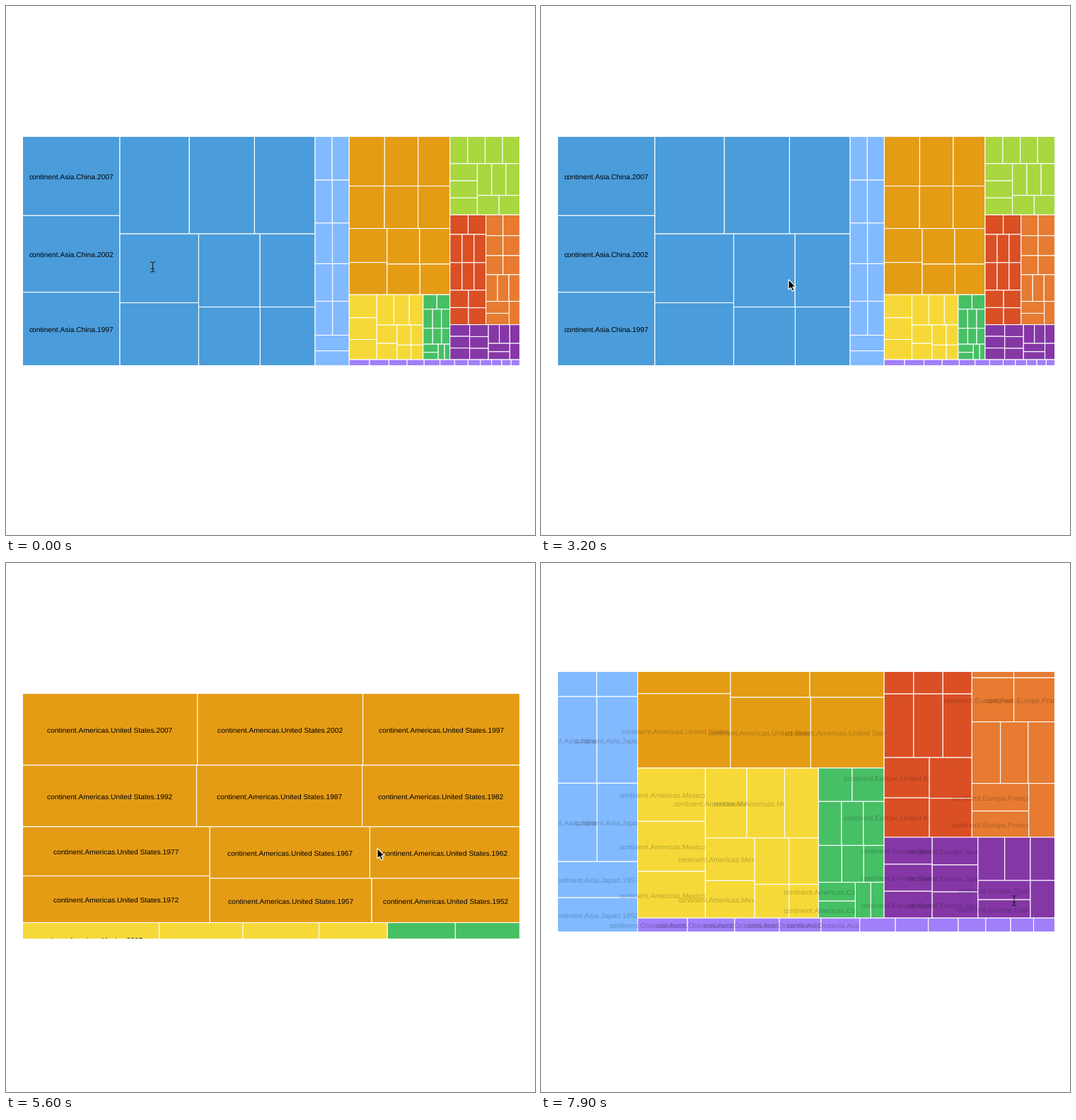
A matplotlib script for the animation above (8000 ms loop, 748 by 748 pixels).

```python
import numpy as np
import matplotlib.pyplot as plt
from matplotlib.animation import FuncAnimation
from matplotlib.patches import Polygon, Rectangle

SIZE, DPI = 748, 100
STEP, FRAMES = 100, 80
ZOOM_MS = 750
FONT_PX = 10.2
PX = 72 / DPI

STAGE = (23.5, 184.5, 703, 324)
CLIP = (24, 154, 703, 376.5)
YEARS = np.arange(2007, 1951, -5)
KEY_YEARS = (2007, 1992, 1972, 1952)

# continent: (cells per strip, {country: (colour, cells per strip, millions in KEY_YEARS)})
WORLD_STRIPS = "121"
WORLD = {
    "Asia": ("11", {
        "China": ("#4b9cda", "332211", (1320, 1160, 850, 552)),
        "Japan": ("#82baff", "222222", (127.5, 124.3, 107.2, 86.5)),
    }),
    "Americas": ("111", {
        "United States": ("#e59c15", "332211", (301.1, 256.9, 209.9, 157.6)),
        "Mexico": ("#f6d938", "332211", (109.5, 88.1, 56, 30)),
        "Canada": ("#47bf65", "23322", (34.2, 29.2, 22.8, 14.4)),
    }),
    "Europe": ("121", {
        "Germany": ("#a8d740", "43311", (82.4, 80.6, 78.7, 69.1)),
        "United Kingdom": ("#da4f24", "233211", (60.8, 57.9, 56.1, 50.4)),
        "France": ("#e67b31", "222321", (61.1, 57.4, 51.7, 42.5)),
        "Spain": ("#8537a6", "33321", (39.4, 38.5, 33.6, 27.9)),
    }),
    "Oceania": ("1", {
        "Australia": ("#a07ffa", "1" * 12, (20.9, 17.5, 12.6, 8.9)),
    }),
}


def growth(keys):
    """Population per year on the cubic through the key years."""
    t = (np.array(KEY_YEARS) - 1980) / 30
    return np.polyval(np.polyfit(t, keys, 3), (YEARS - 1980) / 30)


def strips(rect, counts, values):
    """Fill rect with strips, each laid along the shorter side left."""
    x, y, w, h = rect
    cells, values = [], list(values)
    for n in map(int, counts):
        row, part = values[:n], sum(values[:n]) / sum(values)
        values = values[n:]
        shares = np.array(row) / sum(row)
        offsets = np.cumsum(shares) - shares
        if w <= h:
            cells += [(x + w * o, y, w * s, h * part) for o, s in zip(offsets, shares)]
            y, h = y + h * part, h * (1 - part)
        else:
            cells += [(x, y + h * o, w * part, h * s) for o, s in zip(offsets, shares)]
            x, w = x + w * part, w * (1 - part)
    return cells


def treemap():
    """Country boxes, and (label, colour, box) of every cell in drawing order."""
    people = {c: growth(keys) for _, nations in WORLD.values()
              for c, (_, _, keys) in nations.items()}
    totals = {c: p.sum() for c, p in people.items()}
    sums = [sum(totals[c] for c in nations) for _, nations in WORLD.values()]
    countries, cells = {}, []
    for (land, (rows, nations)), area in zip(WORLD.items(), strips(STAGE, WORLD_STRIPS, sums)):
        boxes = strips(area, rows, [totals[c] for c in nations])
        for (name, (color, counts, _)), rect in zip(nations.items(), boxes):
            countries[name] = rect
            for year, cell in zip(YEARS, strips(rect, counts, people[name])):
                cells.append((f"continent.{land}.{name}.{year}", color, cell))
    return countries, cells


# (start ms, from, to)
ZOOMS = [
    (700, "all", "China"),
    (2483, "China", "all"),
    (4270, "all", "United States"),
    (5900, "United States", "all"),
    (7608, "all", "Spain"),
]

# pointer moves: (start ms, end ms, x, y)
HOME = (207.5, 369)
MOVES = [
    (1600, 2350, 328, 387),
    (2900, 3900, 527, 379),
    (4700, 5400, 524.5, 403),
    (6000, 6750, 650, 486.5),
    (7000, 7600, 669, 477.5),
]
BEAM_OFF, BEAM_ON = 1050, 6550


def ease(t):
    t = min(max(t, 0), 1)
    return 4 * t ** 3 if t < 0.5 else 1 - 4 * (1 - t) ** 3


def pointer(ms):
    pos = np.array(HOME, float)
    for start, end, x, y in MOVES:
        pos += (np.array((x, y)) - pos) * ease((ms - start) / (end - start))
    return pos


plt.rcParams["font.family"] = "Liberation Sans"
plt.rcParams["text.hinting"] = "none"
fig = plt.figure(figsize=(SIZE / DPI, SIZE / DPI), dpi=DPI, facecolor="white")
ax = fig.add_axes([0, 0, 1, 1])
ax.set_xlim(0, SIZE)
ax.set_ylim(SIZE, 0)
ax.axis("off")
clip = Rectangle(CLIP[:2], *CLIP[2:], transform=ax.transData)

countries, items = treemap()
views = {"all": STAGE, **countries}
patches, labels = [], []
for z, (name, color, rect) in enumerate(items, 2):
    patch = ax.add_patch(Rectangle(rect[:2], *rect[2:], facecolor=color, edgecolor="white",
                                   linewidth=1.1 * PX, snap=False, zorder=z))
    label = ax.text(0, 0, name, fontsize=FONT_PX * PX, ha="center", va="baseline",
                    color="black", zorder=z + 0.5)
    for artist in (patch, label):
        artist.set_clip_on(True)
        artist.set_clip_path(clip)
    patches.append(patch)
    labels.append(label)

cells = np.array([rect for _, _, rect in items])
widths = np.array([t.get_window_extent().width for t in labels])

ARROW = np.array([(0.5, 0.5), (0.5, 15), (3.8, 12), (6, 17), (8.6, 16),
                  (6.4, 11), (10.8, 10.8)])
arrow = ax.add_patch(Polygon(ARROW, closed=True, facecolor="black", edgecolor="white",
                             linewidth=1.2 * PX, zorder=500))
GAP = (np.nan, np.nan)
SERIF = np.array([(-3, -7), (-1, -6.8), (0, -5.5), (1, -6.8), (3, -7)])
BEAM = np.vstack([SERIF, GAP, (0, -5.5), (0, 5.5), GAP, (-2, 2.5), (2, 2.5), GAP, -SERIF])
beam, = ax.plot([], [], color="#1a1f2b", linewidth=PX, zorder=500)


def layout(view):
    """Cell boxes and label opacity when the given view fills the stage."""
    vx, vy, vw, vh = views[view]
    kx, ky = STAGE[2] / vw, STAGE[3] / vh
    x, y, w, h = cells.T
    boxes = np.column_stack([STAGE[0] + (x - vx) * kx, STAGE[1] + (y - vy) * ky,
                             w * kx, h * ky])
    return boxes, (w * kx > widths * 0.985).astype(float)


layouts = {view: layout(view) for view in views}


def scene(ms):
    start, a, b = [z for z in ZOOMS if z[0] <= ms or z is ZOOMS[0]][-1]
    p = ease((ms - start) / ZOOM_MS)
    return [u + (v - u) * p for u, v in zip(layouts[a], layouts[b])]


def draw(i):
    ms = i * STEP
    boxes, alphas = scene(ms)
    left, top, cw, ch = CLIP
    for (x, y, w, h), alpha, patch, label in zip(boxes, alphas, patches, labels):
        on_stage = x < left + cw and x + w > left and y < top + ch and y + h > top
        patch.set_bounds(x, y, w, h)
        patch.set_visible(on_stage)
        label.set_position((x + w / 2, y + h / 2 + 4.4))
        label.set_alpha(alpha)
        label.set_visible(bool(on_stage and alpha > 0.004))
    pos = pointer(ms)
    on_text = ms < BEAM_OFF or ms >= BEAM_ON
    arrow.set_visible(not on_text)
    beam.set_visible(on_text)
    arrow.set_xy(ARROW + pos)
    beam.set_data(*(BEAM + pos).T)
    return [*patches, *labels, arrow, beam]


anim = FuncAnimation(fig, draw, frames=FRAMES, interval=STEP, repeat=True,
                     repeat_delay=0, blit=False)
plt.show()
```
